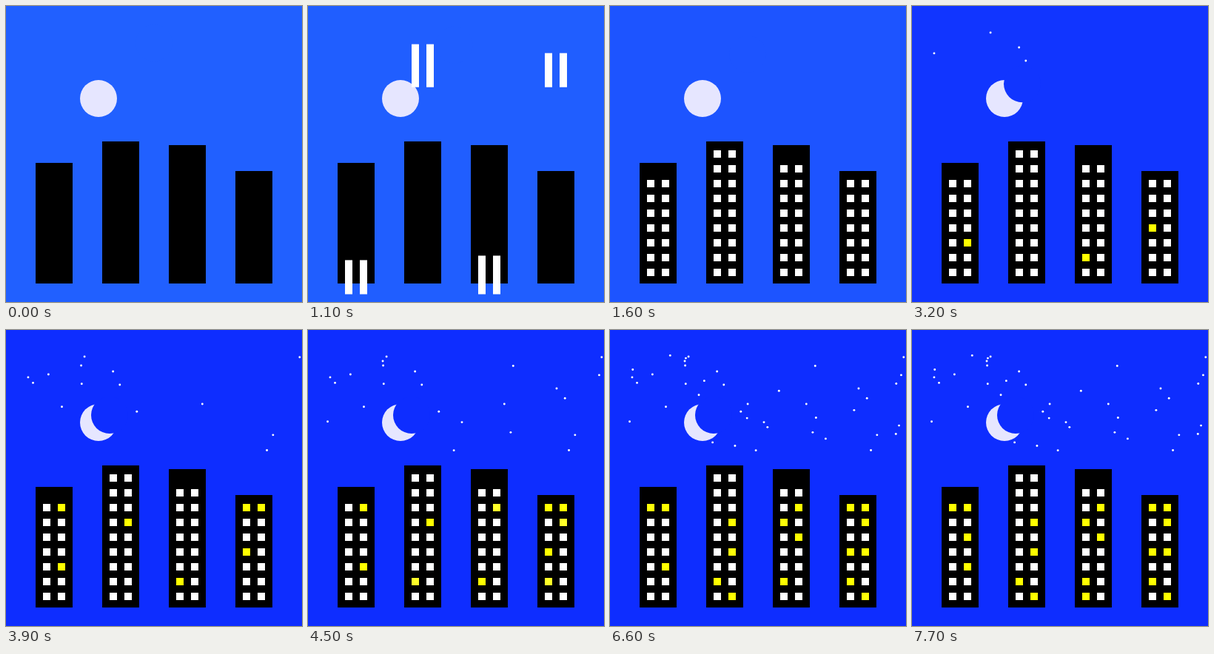
An HTML page with a canvas that plays this animation: 400x400 px, repeating every 8000 ms.

```html
<!DOCTYPE html>
<html lang="en">
<head>
<meta charset="utf-8">
<title>City at night</title>
<style>
  html, body { margin: 0; width: 100%; height: 100%; overflow: hidden; background: #2160ff; }
  canvas { display: block; width: 400px; height: 400px; }
</style>
</head>
<body>
<canvas id="stage" width="400" height="400"></canvas>
<script>
const ctx = document.getElementById('stage').getContext('2d');
const LOOP = 8000;
const GROUND = 375;
const DAY = [33, 96, 255];
const NIGHT = [14, 45, 255];
const MOON = { x: 125, y: 125, r: 25 };

const clamp = v => Math.min(1, Math.max(0, v));
const lerp = (a, b, k) => a + (b - a) * k;

// Small seeded generator, values from 0 to 1
function seeded(seed) {
  return () => (seed = (seed * 16807) % 2147483647) / 2147483647;
}

const towers = [212, 183, 188, 223].map((top, i) => ({ x: 40 + 90 * i, top }));

// Two panes per floor; odd towers get theirs from above, the others from below
const panes = towers.flatMap(({ x, top }, i) => {
  const list = [];
  for (let y = 355; y >= top + 10; y -= 20) {
    list.unshift(...[10, 30].map(dx => ({ x: x + dx, y, from: i % 2 ? -10 : 390 })));
  }
  return list;
});

// Panes that light up, in order, a few at the start of every second
const lit = [9, 44, 54, 1, 21, 48, 49, 35, 28, 51, 58, 31, 39, 55, 0, 25, 36, 61, 5, 46];
lit.forEach((id, n) => {
  panes[id].litAt = 2230 + 1000 * Math.floor((n + 0.515) / 3.51);
});

// Stars are scattered over the sky, clear of the moon
const stars = [];
const rnd = seeded(2024);
while (stars.length < 40) {
  const x = lerp(24, 400, rnd());
  const y = lerp(33, 166, rnd());
  if (Math.hypot(x - MOON.x, y - MOON.y) > MOON.r + 5) stars.push({ x, y });
}

function disc(x, y, r, color) {
  ctx.fillStyle = color;
  ctx.beginPath();
  ctx.arc(x, y, r, 0, Math.PI * 2);
  ctx.fill();
}

function box(x, y, w, h, color) {
  ctx.fillStyle = color;
  ctx.fillRect(x, y, w, h);
}

function drawSky(t) {
  const k = clamp((t - 1000) / 2590);
  const sky = `rgb(${DAY.map((c, i) => Math.round(lerp(c, NIGHT[i], k))).join(',')})`;
  box(0, 0, 400, 400, sky);
  disc(MOON.x, MOON.y, MOON.r, '#e6e6ff');
  // A sky-coloured disc slides over the moon and leaves a crescent
  disc(lerp(200, 140, k), lerp(50, 115, k), MOON.r, sky);
}

function drawStars(t) {
  const count = Math.max(0, Math.ceil((t - 2920) / 71.5));
  stars.slice(0, count).forEach(({ x, y }) => disc(x, y, 1.45, '#fff'));
}

function drawPanes(t) {
  if (t < 500) return;
  // Steady slide, then a snap into place halfway
  const slide = clamp((t - 600) * 0.0006);
  const k = slide < 0.5 ? slide : 1;
  for (const { x, y, from, litAt = Infinity } of panes) {
    const dark = (1 - clamp((t - litAt) / 450)) ** 2;
    box(x, lerp(from, y, k), 10, 10, `rgb(255,255,${Math.round(255 * dark)})`);
  }
}

function draw(t) {
  drawSky(t);
  drawStars(t);
  towers.forEach(({ x, top }) => box(x, top, 50, GROUND - top, '#000'));
  drawPanes(t);
}

const began = performance.now();
function tick() {
  draw((performance.now() - began) % LOOP);
  requestAnimationFrame(tick);
}
tick();
</script>
</body>
</html>
```
